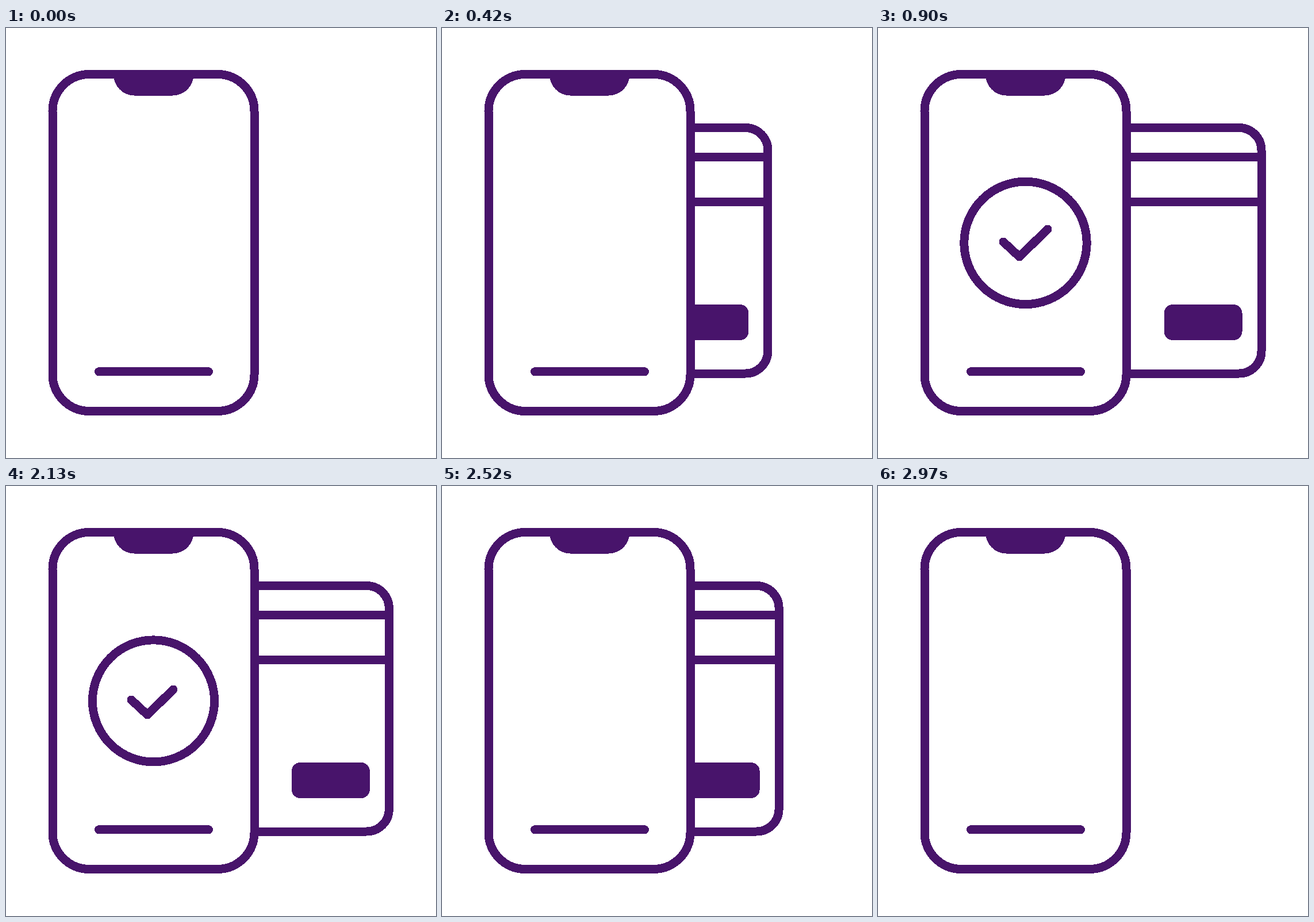
Write an HTML page that moves like this. It is 748x748 px and loops after 3150 ms.

```html
<!DOCTYPE html>
<html lang="en">
<head>
<meta charset="utf-8">
<title>Phone payment</title>
<style>
  html, body { margin: 0; width: 100%; height: 100%; overflow: hidden; background: #fff; }
  svg { display: block; width: 100%; height: 100%; shape-rendering: crispEdges; }
  .line { fill: none; stroke: #48146b; stroke-width: 15; stroke-linecap: round; stroke-linejoin: round; }
  .solid { fill: #48146b; }
</style>
</head>
<body>
<svg viewBox="0 0 748 748">
  <clipPath id="beside"><rect x="432" y="0" width="316" height="748"/></clipPath>
  <g clip-path="url(#beside)">
    <g id="card">
      <rect class="line" x="300" y="173.5" width="367" height="427.5" rx="39"/>
      <path class="line" d="M300 224.5H667M300 302H667"/>
      <rect class="solid" x="497.5" y="481" width="136" height="62" rx="15"/>
    </g>
  </g>
  <rect class="line" x="81" y="80.5" width="351" height="586" rx="64"/>
  <path class="solid" d="M187 81a36.5 36.5 0 0 0 36.5 36.5h66.5a36.5 36.5 0 0 0 36.5-36.5z"/>
  <path class="line" d="M161.5 597.8H352.5"/>
  <circle id="ring" class="line" r="106.7"/>
  <path id="tick" class="line" pathLength="1" d="M218 372L246 398L295 350"/>
</svg>
<script>
  const LOOP = 3150, STEP = 30, MOVE = 900, CLOSE_AT = 2100;
  const CARD_TRAVEL = 249, RING_TIME = 360, RING_SHRINK = 0.31, TICK_TIME = 305;
  const [card, ring, tick] = ['card', 'ring', 'tick'].map(id => document.getElementById(id));

  function bezier(x1, y1, x2, y2) {
    const at = (a, b, u) => 3 * a * u * (1 - u) ** 2 + 3 * b * u * u * (1 - u) + u ** 3;
    return x => {
      if (x <= 0) return 0;
      if (x >= 1) return 1;
      let lo = 0, hi = 1;
      for (let i = 0; i < 30; i++) {
        const mid = (lo + hi) / 2;
        if (at(x1, x2, mid) < x) lo = mid; else hi = mid;
      }
      return at(y1, y2, lo);
    };
  }

  const cardEase = bezier(1 / 3, 0, 5 / 6, 5 / 6);
  const ringEase = bezier(1 / 3, 0, 2 / 3, 1);
  const tickEase = bezier(0.2, 0, 2 / 3, 1);

  // Time away from the fully open pose; closing mirrors opening.
  function awayFromOpen(t) {
    if (t < MOVE) return MOVE - t;
    return Math.min(MOVE, Math.max(0, t - CLOSE_AT));
  }

  function draw(now) {
    const t = Math.floor((now % LOOP) / STEP) * STEP;
    const away = awayFromOpen(t);

    card.setAttribute('transform', `translate(${-CARD_TRAVEL * cardEase(away / MOVE)} 0)`);

    const scale = 1 - RING_SHRINK * ringEase(away / RING_TIME);
    ring.setAttribute('transform', `translate(256.5 373.9) scale(${scale})`);
    ring.setAttribute('visibility', away <= RING_TIME ? 'visible' : 'hidden');

    const drawn = 1 - tickEase(away / TICK_TIME);
    tick.setAttribute('stroke-dasharray', drawn < 1 ? `${drawn} 2` : 'none');
    tick.setAttribute('visibility', drawn > 0 ? 'visible' : 'hidden');
  }

  const start = performance.now();
  function loop() {
    draw(performance.now() - start);
    requestAnimationFrame(loop);
  }
  loop();
</script>
</body>
</html>
```
